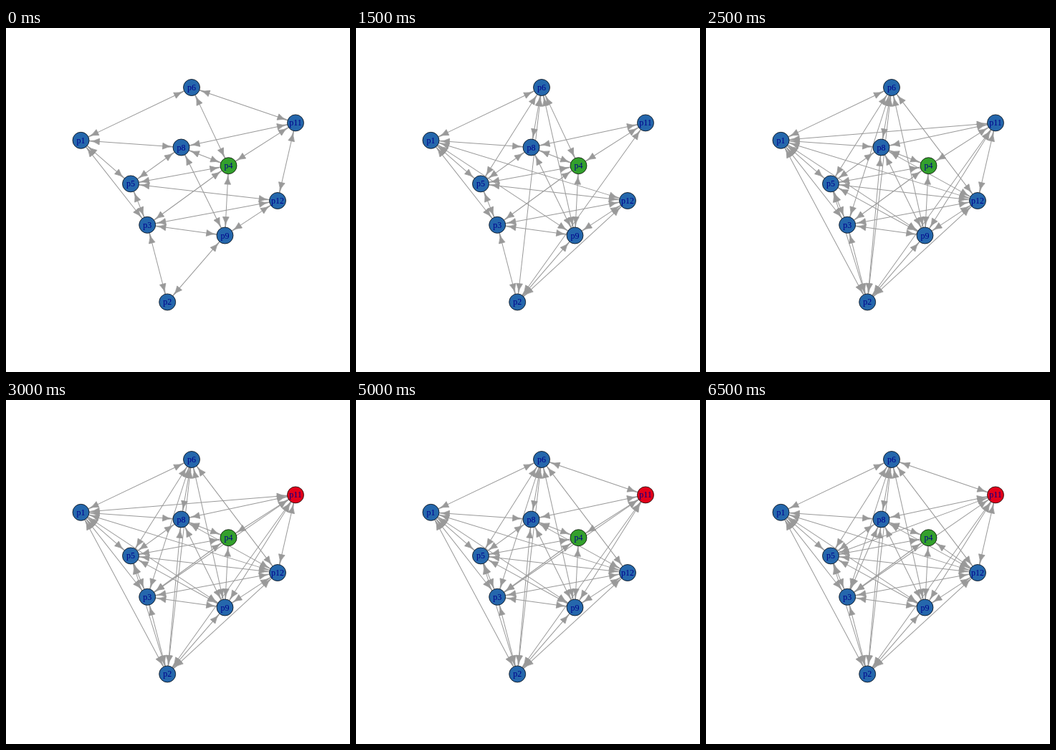
Write an HTML page with a canvas that moves like this. It is 480 px wide and 480 px high and loops after 7 s.

```html
<!DOCTYPE html>
<html lang="en">
<head>
<meta charset="utf-8">
<title>Network</title>
<style>
html, body { margin: 0; width: 100%; height: 100%; overflow: hidden; background: #fff; }
canvas { display: block; }
</style>
</head>
<body>
<canvas id="stage" width="480" height="480"></canvas>
<script>
const ctx = document.getElementById('stage').getContext('2d');
const LOOP = 7000, RADIUS = 11.5, HEAD = 14.4, HALF = 4.4;
const BLUE = '#2567ac', GREEN = '#33a02c', RED = '#e2001a', GREY = '#999';

const nodes = {
  1: [104.5, 156.8], 2: [225.2, 382.4], 3: [197.2, 274.8], 4: [310.5, 192.2],
  5: [174, 217.4], 6: [259, 83], 8: [244.5, 166.5], 9: [305.5, 289.5],
  11: [404, 132.4], 12: [379, 241]
};

const start = '1-6 1-8 1-5 1-3 6-11 6-4 8-11 8-4 8-5 8-9 4-11 4-5 4-3 4-9 ' +
  '11-12 5-12 5-3 3-12 3-9 3-2 9-2 9-12';

// time, whether p11 is red, links that switch on or off
const steps = [
  [0, false, ''],
  [500, true, '1-9 6-8 6-9 2-11'],
  [1000, true, '6-5 6-2 2-12 11-12'],
  [1500, false, '1-12 6-11'],
  [2000, true, '1-11 1-2 6-3 6-4 8-2 9-11 11-12 5-9'],
  [2500, false, '6-12 5-2 8-12'],
  [3000, true, '3-11'],
  [3500, false, '1-11 11-12'],
  [4000, false, '6-11'],
  [5000, true, ''],
  [5500, false, '8-3 4-11'],
  [6000, true, '5-11 11-12'],
  [6500, true, '4-12']
];

const links = new Set(start.split(' '));
const states = steps.map(([time, red, toggles]) => {
  for (const link of toggles.split(' ').filter(Boolean))
    if (!links.delete(link)) links.add(link);
  return { time, red, links: [...links] };
});

// Arrowhead with its tip at the origin, widening along +x
function drawHead() {
  ctx.beginPath();
  ctx.moveTo(0, 0);
  ctx.quadraticCurveTo(HEAD / 2, 0, HEAD, HALF);
  ctx.lineTo(HEAD, -HALF);
  ctx.quadraticCurveTo(HEAD / 2, 0, 0, 0);
  ctx.fill();
  ctx.lineWidth = 0.75;
  ctx.stroke();
}

function drawLink(link) {
  const [[ax, ay], [bx, by]] = link.split('-').map(id => nodes[id]);
  const length = Math.hypot(bx - ax, by - ay) - 2 * RADIUS;
  ctx.save();
  ctx.translate(ax, ay);
  ctx.rotate(Math.atan2(by - ay, bx - ax));
  ctx.translate(RADIUS, 0);
  ctx.lineWidth = 1;
  ctx.beginPath();
  ctx.moveTo(0, 0);
  ctx.lineTo(length, 0);
  ctx.stroke();
  drawHead();
  ctx.translate(length, 0);
  ctx.scale(-1, 1);
  drawHead();
  ctx.restore();
}

function drawNode(id, color) {
  const [x, y] = nodes[id];
  ctx.beginPath();
  ctx.arc(x, y, RADIUS, 0, 2 * Math.PI);
  ctx.fillStyle = color;
  ctx.fill();
  ctx.strokeStyle = '#000';
  ctx.lineWidth = 0.75;
  ctx.stroke();
  ctx.fillStyle = '#00008b';
  ctx.fillText('p' + id, x, y + 4);
}

function draw(state) {
  ctx.fillStyle = '#fff';
  ctx.fillRect(0, 0, 480, 480);
  ctx.fillStyle = ctx.strokeStyle = GREY;
  state.links.forEach(drawLink);
  ctx.font = '12px "Liberation Serif", serif';
  ctx.textAlign = 'center';
  for (const id in nodes)
    drawNode(id, id === '4' ? GREEN : id === '11' && state.red ? RED : BLUE);
}

function tick() {
  const time = performance.now() % LOOP;
  draw(states.findLast(state => state.time <= time));
  requestAnimationFrame(tick);
}
tick();
</script>
</body>
</html>
```
